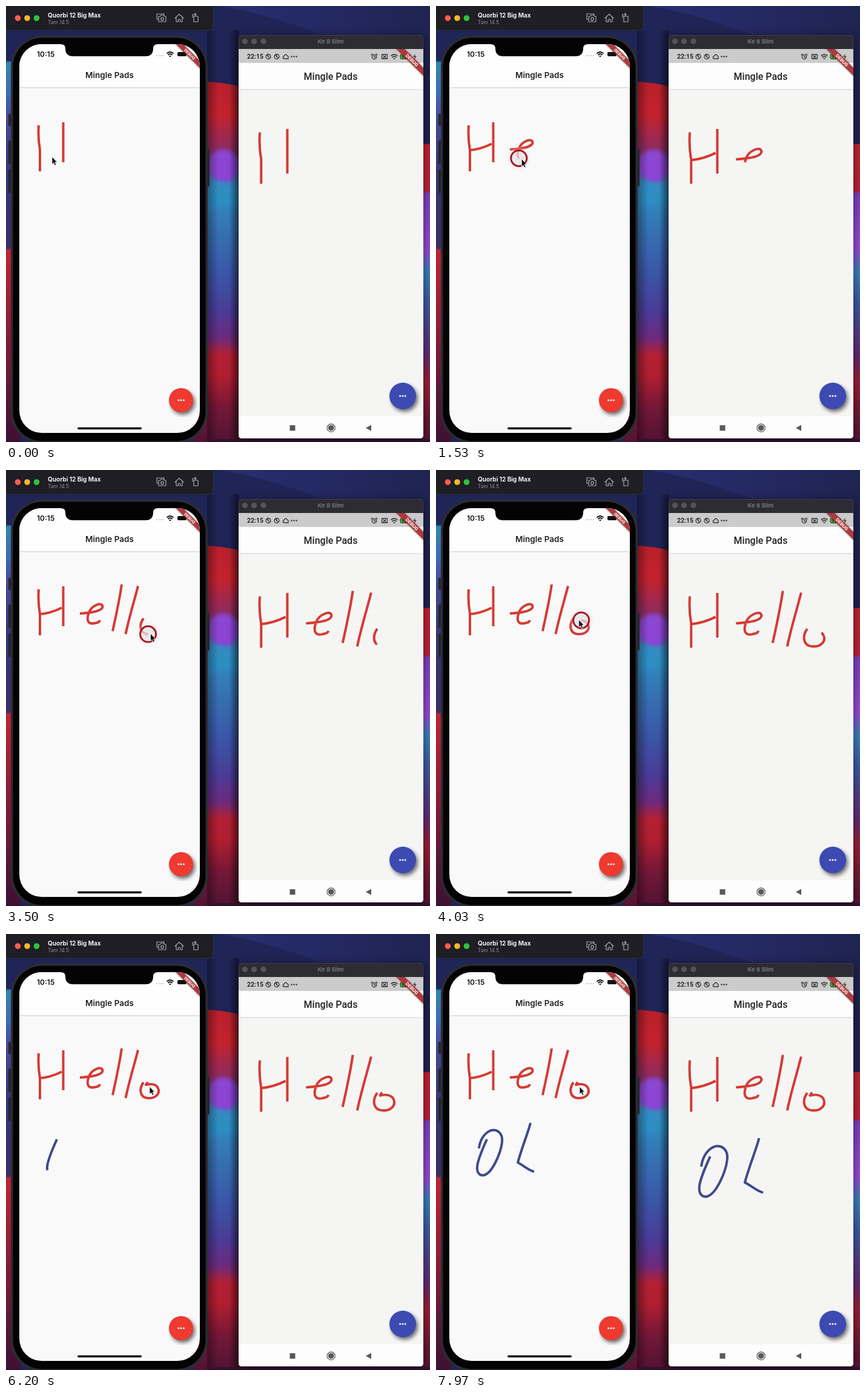
Recreate the animation shown at these times as an HTML page. Size 700x720 px, loop 8 s.

```html
<!DOCTYPE html>
<html lang="en">
<head>
<meta charset="utf-8">
<title>Shared drawing</title>
<style>
  html, body { margin: 0; width: 100%; height: 100%; overflow: hidden; background: #1f2556; }
  svg { display: block; width: 700px; height: 720px; }
  .ui { font-family: Inter, sans-serif; }
  .droid { font-family: Roboto, sans-serif; }
  .mid { text-anchor: middle; }
  .line { fill: none; stroke-linecap: round; stroke-linejoin: round; }
</style>
</head>
<body>
<svg viewBox="0 0 700 720">
  <defs>
    <linearGradient id="middle" x2="0" y2="1">
      <stop offset=".17" stop-color="#b8202c"/><stop offset=".25" stop-color="#c4222e"/>
      <stop offset=".33" stop-color="#8a2c60"/><stop offset=".40" stop-color="#4a78c0"/>
      <stop offset=".43" stop-color="#2f8cc0"/><stop offset=".52" stop-color="#3670b4"/>
      <stop offset=".62" stop-color="#3c54a6"/><stop offset=".70" stop-color="#4a3c98"/>
      <stop offset=".76" stop-color="#6c2a80"/><stop offset=".80" stop-color="#b42034"/>
      <stop offset=".85" stop-color="#b01e30"/><stop offset=".92" stop-color="#741838"/>
      <stop offset="1" stop-color="#521434"/>
    </linearGradient>
    <linearGradient id="leftEdge" x2="0" y2="1">
      <stop offset=".125" stop-color="#1f2556"/><stop offset=".13" stop-color="#2f86b4"/>
      <stop offset=".20" stop-color="#3d6cb0"/><stop offset=".26" stop-color="#444a98"/>
      <stop offset=".38" stop-color="#343878"/><stop offset=".555" stop-color="#3c2c68"/>
      <stop offset=".56" stop-color="#c02434"/><stop offset=".72" stop-color="#961c34"/>
      <stop offset=".9" stop-color="#581638"/><stop offset="1" stop-color="#3c1230"/>
    </linearGradient>
    <linearGradient id="rightEdge" x2="0" y2="1">
      <stop offset=".315" stop-color="#1f2450"/><stop offset=".318" stop-color="#c42430"/>
      <stop offset=".425" stop-color="#bd2238"/><stop offset=".43" stop-color="#8040c0"/>
      <stop offset=".56" stop-color="#9a4cdc"/><stop offset=".61" stop-color="#3a84c0"/>
      <stop offset=".68" stop-color="#3e5ca8"/><stop offset=".80" stop-color="#642a78"/>
      <stop offset=".86" stop-color="#a01e34"/><stop offset="1" stop-color="#501434"/>
    </linearGradient>
    <linearGradient id="sky">
      <stop offset="0" stop-color="#282e72"/><stop offset="1" stop-color="#1f2452"/>
    </linearGradient>
    <linearGradient id="bezelShade">
      <stop offset="0" stop-color="#000" stop-opacity=".35"/><stop offset=".35" stop-color="#000" stop-opacity="0"/>
      <stop offset=".7" stop-color="#000" stop-opacity="0"/><stop offset="1" stop-color="#000" stop-opacity=".4"/>
    </linearGradient>
    <radialGradient id="glow">
      <stop offset=".45" stop-color="#d8d6dc" stop-opacity=".6"/><stop offset="1" stop-color="#d8d6dc" stop-opacity="0"/>
    </radialGradient>
    <filter id="blur"><feGaussianBlur stdDeviation="3"/></filter>
    <filter id="soft" x="-50%" y="-50%" width="200%" height="200%"><feGaussianBlur stdDeviation="8"/></filter>
    <clipPath id="leftScreen"><rect x="22" y="63" width="298" height="642" rx="37"/></clipPath>
    <clipPath id="rightScreen"><path d="M384 71H689V708q0 6-6 6H390q-6 0-6-6z"/></clipPath>
    <g id="dots" fill="#fff"><circle cx="-4.3" r="1.5"/><circle r="1.5"/><circle cx="4.3" r="1.5"/></g>
    <g id="wifi" class="line" stroke-width="1.8"><path d="M-5-2Q0-6 5-2M-3 .5Q0-2 3 .5M-.6 3h1.2"/></g>
    <g id="ribbon">
      <rect x="-44" y="28" width="88" height="13" fill="#000" opacity=".4" filter="url(#blur)"/>
      <rect x="-44" y="28" width="88" height="12" fill="#ac3a3c"/>
      <text class="ui mid" y="37.4" font-size="9.6" font-weight="800" fill="#fbeeee">DEBUG</text>
    </g>
  </defs>

  <!-- wallpaper -->
  <rect width="700" height="720" fill="#1f2556"/>
  <rect width="24" height="720" fill="url(#leftEdge)"/>
  <rect x="310" width="80" height="720" fill="url(#middle)"/>
  <rect x="686" width="14" height="720" fill="url(#rightEdge)"/>
  <path d="M310 0H390V134Q360 126 332 125H310z" fill="#1f2556"/>
  <path d="M352 0Q430 13 522 47H700V0z" fill="url(#sky)"/>
  <ellipse cx="359" cy="264" rx="26" ry="27" fill="#8c44d4" filter="url(#blur)"/>
  <path d="M330 285Q360 289 390 303V335Q350 320 330 345z" fill="#2f90c4" opacity=".75" filter="url(#blur)"/>
  <rect x="332" y="40" width="52" height="680" fill="url(#bezelShade)"/>
  <rect x="340" y="715" width="360" height="5" fill="#34122c"/>

  <!-- left simulator -->
  <path d="M0 0H342V34q0 6-6 6H0z" fill="#1e1e24"/>
  <path d="M0 40H336q6 0 6-6V0" fill="none" stroke="#30303a"/>
  <circle cx="19.5" cy="20" r="4.8" fill="#fc5b57"/>
  <circle cx="35" cy="20" r="4.8" fill="#fcb82f"/>
  <circle cx="50.5" cy="20" r="4.8" fill="#31c33c"/>
  <g class="ui">
    <text x="69" y="18.5" font-size="10" font-weight="700" fill="#f2f2f4">Quorbi 12 Big Max</text>
    <text x="69" y="29.5" font-size="8.4" fill="#8e8e94">Tam 14.5</text>
  </g>
  <g class="line" stroke="#a8a8ae" stroke-width="1.2">
    <path d="M251 22h-2v-9h12v2M252 17h3l1-2h4l1 2h3v9h-12z"/><circle cx="258" cy="21.5" r="2.3"/>
    <path d="M279 20l7-6.5 7 6.5M281 19v7h3.5v-4h3v4h3.5v-7"/>
    <path d="M310 17h7v9h-7zM308 19v-5h6M312 12l2 2-2 2"/>
  </g>
  <g fill="#26262c">
    <rect x="4" y="178" width="6" height="20" rx="2"/><rect x="4" y="222" width="6" height="39" rx="2"/>
    <rect x="4" y="270" width="6" height="39" rx="2"/><rect x="330" y="236" width="6" height="62" rx="2"/>
  </g>
  <rect x="8" y="49" width="325" height="673" rx="51" fill="#2c2c32"/>
  <rect x="11.5" y="52.5" width="318" height="666" rx="48" fill="#030304"/>
  <g clip-path="url(#leftScreen)">
    <rect x="22" y="63" width="298" height="642" fill="#f9f9fa"/>
    <rect x="22" y="130" width="298" height="5" fill="#808084" opacity=".5" filter="url(#blur)"/>
    <rect x="22" y="63" width="298" height="71" fill="#fefefe"/>
    <path d="M90 63q8 0 8 7 0 13 13 13H230q13 0 13-13 0-7 8-7z" fill="#030304"/>
    <text class="ui" x="51" y="83.5" font-size="12" font-weight="600" fill="#111">10:15</text>
    <g fill="#b6b6ba"><circle cx="249" cy="82" r="1"/><circle cx="252.5" cy="82" r="1"/><circle cx="256" cy="82" r="1"/><circle cx="259.5" cy="82" r="1"/></g>
    <use href="#wifi" x="271" y="80" stroke="#111"/>
    <rect x="283" y="76" width="15" height="7" rx="2" fill="#111"/>
    <text class="ui mid" x="171" y="119.3" font-size="13.5" font-weight="600" fill="#222224">Mingle Pads</text>
    <use href="#ribbon" transform="translate(320 63) rotate(45) scale(.696)"/>
    <g id="leftInk"></g>
    <circle cx="292" cy="655" r="20" fill="#202024" opacity=".65" filter="url(#blur)"/>
    <circle cx="289" cy="651" r="20" fill="#ee3a30"/><use href="#dots" x="289" y="651"/>
    <rect x="118" y="695.7" width="106" height="3.6" rx="1.8" fill="#080808"/>
  </g>

  <!-- right device window -->
  <rect x="382" y="50" width="309" height="668" rx="8" fill="#000" opacity=".45" filter="url(#soft)"/>
  <path d="M384 72V54q0-6 6-6H683q6 0 6 6V72z" fill="#2d2b33"/>
  <path d="M384.5 71V54q0-5.5 6-5.5H683q5.500 0 5.500 5.500V71" fill="none" stroke="#44424c"/>
  <g fill="#55535a"><circle cx="394.5" cy="58.5" r="4.7"/><circle cx="409.5" cy="58.5" r="4.7"/><circle cx="425" cy="58.5" r="4.7"/></g>
  <text class="ui mid" x="536" y="62" font-size="9.5" font-weight="700" fill="#76747c">Ke 8 Slim</text>
  <g clip-path="url(#rightScreen)">
    <rect x="384" y="71" width="305" height="643" fill="#f5f6f4"/>
    <rect x="384" y="134" width="305" height="4" fill="#808084" opacity=".4" filter="url(#blur)"/>
    <rect x="384" y="94" width="305" height="43" fill="#fdfdfd"/>
    <rect x="384" y="71" width="305" height="23" fill="#cbcbcc"/>
    <rect x="384" y="678" width="305" height="36" fill="#fdfdfd"/>
    <text class="droid" x="398" y="87.3" font-size="10.5" font-weight="600" fill="#28282a">22:15</text>
    <g class="line" stroke="#343436" stroke-width="1.3">
      <circle cx="433" cy="83.5" r="4"/><path d="M431 81.5l4 4M433 81v3"/>
      <circle cx="447" cy="83.5" r="4"/><path d="M445 81.5l4 4M447 81v3"/>
      <path d="M459 87q-3-1-1-4 2 0 2-2 3-2 4 1 3 1 2 5z"/>
      <circle cx="608" cy="84" r="3.7"/><path d="M603 81l2-2M613 81l-2-2M608 82v2.5h2"/>
      <path d="M620.5 80h9v7h-9zM623 82l4 3.5M627 82l-4 3.5"/>
    </g>
    <g fill="#343436"><circle cx="471.5" cy="83.5" r="1.3"/><circle cx="475.5" cy="83.5" r="1.3"/><circle cx="479.5" cy="83.5" r="1.3"/></g>
    <use href="#wifi" x="641" y="84" stroke="#4a4a4c"/>
    <rect x="651" y="79.5" width="17" height="8" rx="2" fill="#45a536" stroke="#343436"/>
    <text class="droid mid" x="659.5" y="86.3" font-size="7.5" font-weight="700" fill="#182b14">100</text>
    <path d="M676 79l-4 5h3l-1 4 4-5h-3z" fill="#343436"/>
    <text class="droid mid" x="536" y="122" font-size="16" font-weight="500" fill="#222224">Mingle Pads</text>
    <use href="#ribbon" transform="translate(689 71) rotate(45) scale(.78)"/>
    <g id="rightInk" transform="translate(358.5 -11.7) scale(1.121 1.118)"></g>
    <circle cx="658" cy="648" r="22" fill="#202024" opacity=".65" filter="url(#blur)"/>
    <circle cx="655" cy="644" r="22" fill="#3c4ab2"/><use href="#dots" x="655" y="644"/>
    <g fill="#58585a"><rect x="468.5" y="692.3" width="9" height="9"/><circle cx="536.7" cy="696.7" r="4.8"/><path d="M594 696.7l9-5v10z"/></g>
    <circle cx="536.7" cy="696.7" r="6.6" fill="none" stroke="#58585a" stroke-width="1.2"/>
  </g>

  <g id="ring">
    <circle r="21" fill="url(#glow)"/>
    <circle r="13" fill="#f4f0f2" fill-opacity=".35" stroke="#a81820" stroke-width="3"/>
  </g>
  <path id="cursor" d="M0-1V11.5L2.7 9 4.7 13.3 6.9 12.3 5 8.1H8.5z" fill="#080808" stroke="#fff" stroke-width=".8"/>
</svg>
<script>
const LOOP = 8000, INK_LAG = 50, MIRROR_LAG = 160, BLUE_MIRROR_LAG = 300;
const RED = '#d63a34', BLUE = '#3f4a8c';

// Stroke path, colour, start and end time in ms.
const strokes = [
  ['M54 197C53 211 53 221 56 237V273', RED, -900, -600],
  ['M94.5 192V258', RED, -400, -200],
  ['M56 238C69 237 81 233 92 227.5', RED, 200, 450],
  ['M122 237C136 236 160 234 159.5 225C158 217 141 224 137 235C131 251 138 255 146 253C151 252 154 252 155 248', RED, 590, 1690],
  ['M191 189C187 217 181 243 176 266', RED, 2020, 2250],
  ['M218 191.5C211 219 203 244 197.500 271', RED, 2560, 2675],
  ['M227 245C219 256 221 270 234 271C247 272 254 264 251.5 256C249 248 240 247 231 249L234 244.5', RED, 3020, 4160],
  ['M84 339C77 355 69 372 68 384C67 395 73 400 80 398C93 394 107 362 109 344C111 328 100 321 89 325C78 330 72 343 71 354', BLUE, 5950, 6900],
  ['M156 312C152 328 142 352 135 377.5C143 381 152 390 162 392.5', BLUE, 7200, 7550],
].map(([d, color, start, end]) => ({
  color, start, end,
  left: addPath('leftInk', d, color, 4),
  right: addPath('rightInk', d, color, 3.6),
}));

function addPath(parentId, d, color, width) {
  const path = document.createElementNS('http://www.w3.org/2000/svg', 'path');
  const attributes = { d, stroke: color, 'stroke-width': width, fill: 'none', 'stroke-linejoin': 'round' };
  for (const name in attributes) path.setAttribute(name, attributes[name]);
  document.getElementById(parentId).append(path);
  path.total = path.getTotalLength();
  return path;
}

const clamp = x => Math.min(1, Math.max(0, x));
const smooth = x => x * x * (3 - 2 * x);
const progress = (s, t) => clamp((t - s.start) / (s.end - s.start));
const along = (path, p) => path.getPointAtLength(path.total * p);

function reveal(path, p) {
  path.style.display = p > 0 ? '' : 'none';
  path.style.strokeDasharray = p < 1 ? `${path.total * p} ${path.total * 2}` : 'none';
}

const mouseStrokes = strokes.filter(s => s.color === RED && s.start > 0);

// Follows the active stroke and glides between strokes.
function pointer(t) {
  let from = { x: 76, y: 250 }, left = 0;
  for (const s of mouseStrokes) {
    if (t < s.start) return glide(from, along(s.left, 0), (t - left) / (s.start - left));
    if (t <= s.end) return along(s.left, progress(s, t));
    from = along(s.left, 1);
    left = s.end;
  }
  return glide(from, { x: 237, y: 253 }, (t - left) / 200);
}

function glide(a, b, p) {
  const k = smooth(clamp(p));
  return { x: a.x + (b.x - a.x) * k, y: a.y + (b.y - a.y) * k };
}

const ring = document.getElementById('ring'), cursor = document.getElementById('cursor');
const place = (el, p) => el.setAttribute('transform', `translate(${p.x} ${p.y})`);

function draw(t) {
  for (const s of strokes) {
    const blue = s.color === BLUE;
    reveal(s.left, progress(s, t - (blue ? 0 : INK_LAG)));
    reveal(s.right, progress(s, t - (blue ? BLUE_MIRROR_LAG : MIRROR_LAG)));
  }
  const pressed = mouseStrokes.some(s => t >= s.start && t <= s.end + 90);
  ring.style.display = pressed ? '' : 'none';
  place(ring, pointer(t - INK_LAG));
  place(cursor, pointer(t));
}

const begin = performance.now();
function frame() {
  draw((performance.now() - begin) % LOOP);
  requestAnimationFrame(frame);
}
frame();
</script>
</body>
</html>
```
